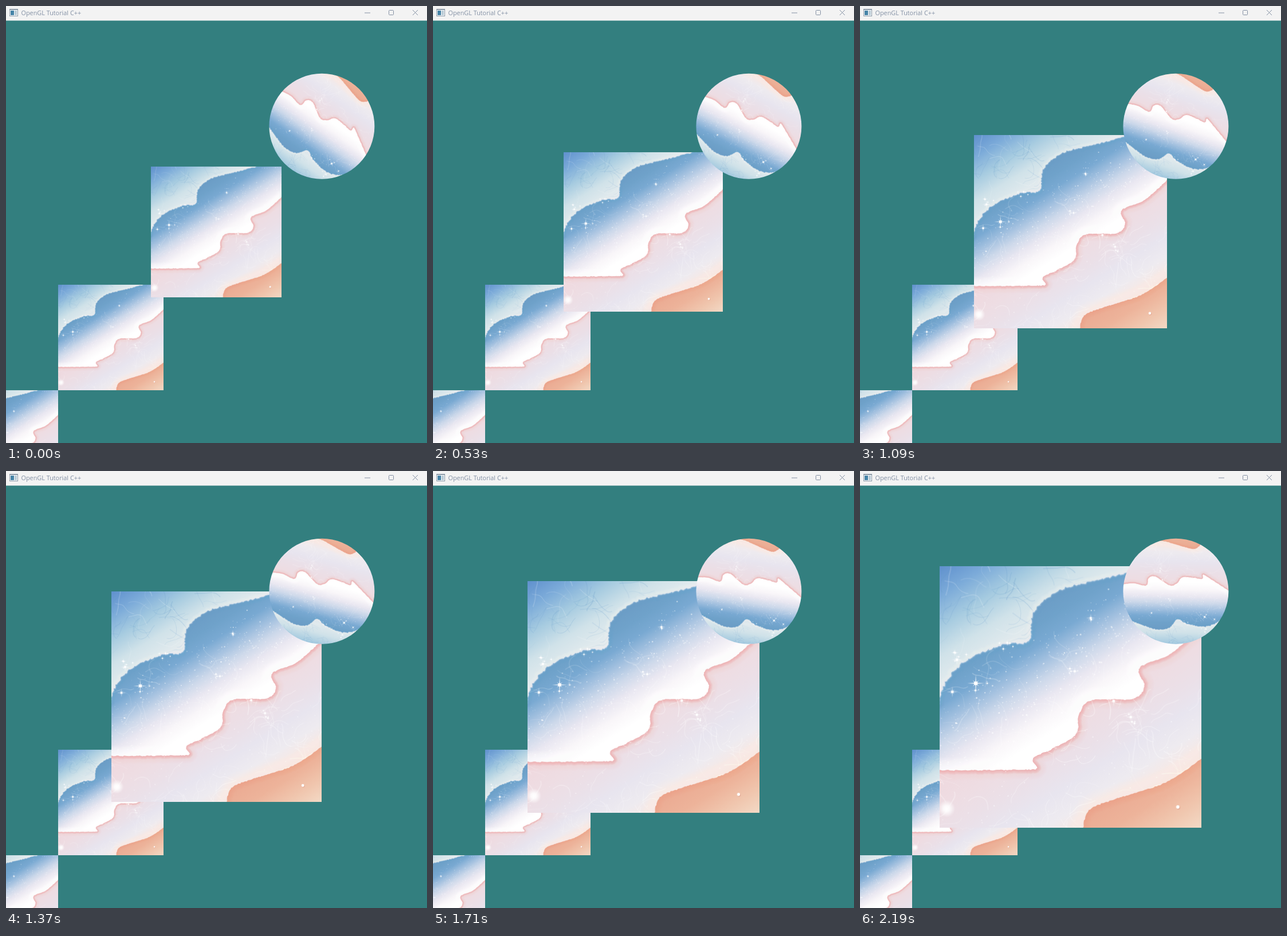
Recreate the animation shown at these times as an HTML page with a canvas. Size 735 by 762 pixels, loop 2260 ms.

```html
<!DOCTYPE html>
<html lang="en">
<head>
<meta charset="utf-8">
<title>OpenGL Tutorial C++</title>
<style>
html, body { margin: 0; width: 100%; height: 100%; overflow: hidden; background: #337f7f; }
canvas { display: block; }
</style>
</head>
<body>
<canvas id="stage" width="735" height="762"></canvas>
<script>
const ctx = document.getElementById('stage').getContext('2d');
const SIZE = 457;

let seed = 20;
function rnd() {
  seed = (seed * 1664525 + 1013904223) % 4294967296;
  return seed / 4294967296;
}
const spread = r => (rnd() * 2 - 1) * r;

// Key points of the three shorelines, from left to right
const foamKeys = [[-4, 245], [9, 206], [42, 169], [108, 138], [156, 131], [163, 84], [206, 44], [281, 24], [388, -4]];
const washKeys = [[-4, 357], [70, 357], [130, 356], [169, 354], [163, 336], [200, 318], [238, 295], [243, 262],
  [259, 237], [300, 233], [340, 232], [358, 211], [350, 178], [405, 153], [461, 102]];
const sandKeys = [[250, 464], [261, 427], [311, 406], [396, 378], [461, 334]];

// Smooth curve through the keys with a ragged edge
function shore(keys, rough) {
  const at = i => keys[Math.max(0, Math.min(keys.length - 1, i))];
  const pts = [];
  for (let i = 0; i < keys.length - 1; i++) {
    const [a, b, c, d] = [-1, 0, 1, 2].map(k => at(i + k));
    const n = Math.ceil(Math.hypot(c[0] - b[0], c[1] - b[1]) / 3);
    for (let j = 0; j < n; j++) {
      const t = j / n;
      pts.push([0, 1].map(k => spread(rough) + b[k] + 0.5 * t * (c[k] - a[k] +
        t * (2 * a[k] - 5 * b[k] + 4 * c[k] - d[k] + t * (3 * (b[k] - c[k]) + d[k] - a[k])))));
    }
  }
  return [...pts, at(keys.length)];
}

function trace(g, pts) {
  g.beginPath();
  pts.forEach(([x, y]) => g.lineTo(x, y));
}

// Colour ramp that runs across the waves
function ramp(g, from, to, colors) {
  const nx = 0.53, ny = 0.85;
  const grad = g.createLinearGradient(nx * from, ny * from, nx * to, ny * to);
  colors.forEach((c, i) => grad.addColorStop(i / (colors.length - 1), c));
  return grad;
}

function glow(g, pts, color, width, alpha) {
  g.strokeStyle = color;
  g.globalAlpha = alpha;
  for (let w = width; w > 1; w -= width / 9) {
    trace(g, pts);
    g.lineWidth = w;
    g.stroke();
  }
  g.globalAlpha = 1;
}

function region(g, pts, corners, fill, paint) {
  g.save();
  trace(g, pts.concat(corners));
  g.closePath();
  g.fillStyle = fill;
  g.fill();
  g.clip();
  paint();
  g.restore();
}

function veins(g, count, [x0, y0, w, h], color, alpha) {
  g.strokeStyle = color;
  for (let i = 0; i < count; i++) {
    let x = x0 + rnd() * w, y = y0 + rnd() * h, a = rnd() * 6.28;
    g.beginPath();
    g.moveTo(x, y);
    for (let j = 0; j < 4; j++) {
      const b = a + spread(1), r = 4 + rnd() * 5;
      const cx = x + Math.cos(a) * r, cy = y + Math.sin(a) * r;
      x = cx + Math.cos(b) * r;
      y = cy + Math.sin(b) * r;
      g.quadraticCurveTo(cx, cy, x, y);
      a = b;
    }
    g.globalAlpha = alpha * (0.4 + rnd() * 0.6);
    g.lineWidth = 0.7 + rnd() * 1.2;
    g.stroke();
  }
  g.globalAlpha = 1;
}

function dot(g, x, y, r, alpha = 1) {
  g.globalAlpha = alpha;
  g.beginPath();
  g.arc(x, y, r, 0, 7);
  g.fill();
  g.globalAlpha = 1;
}

function star(g, x, y, r) {
  g.beginPath();
  for (let i = 0; i < 16; i++) {
    const a = i * Math.PI / 8;
    const q = i % 2 ? r * 0.13 : i % 4 ? r * 0.5 : r;
    g.lineTo(x + Math.sin(a) * q, y + Math.cos(a) * q);
  }
  g.fill();
  dot(g, x, y, r * 0.22);
}

// One bright star with smaller ones around it
function cluster(g, x, y, r, count, reach) {
  star(g, x, y, r);
  for (let i = 0; i < count; i++) star(g, x + spread(reach), y + spread(reach * 0.7), 3 + rnd() * 4);
}

function blob(g, x, y, r) {
  const grad = g.createRadialGradient(x, y, 0, x, y, r);
  grad.addColorStop(0, '#fff');
  grad.addColorStop(0.35, 'rgba(255,255,255,.85)');
  grad.addColorStop(1, 'rgba(255,255,255,0)');
  g.fillStyle = grad;
  g.fillRect(x - r, y - r, 2 * r, 2 * r);
}

function makeBeach() {
  const c = document.createElement('canvas');
  c.width = c.height = SIZE;
  const g = c.getContext('2d');
  g.lineJoin = g.lineCap = 'round';
  const foam = shore(foamKeys, 1.8), wash = shore(washKeys, 0.9), sand = shore(sandKeys, 0.8);
  const right = [461, 461], left = [-4, 461];

  g.fillStyle = ramp(g, 0, 180, ['#5f90cd', '#7cabd9', '#a6cbe0', '#d0e2e9', '#e3ebee']);
  g.fillRect(0, 0, SIZE, SIZE);
  veins(g, 40, [0, 0, 220, 140], '#6499c9', 0.25);
  veins(g, 25, [0, 0, 330, 190], '#ffffff', 0.25);
  glow(g, foam, '#e9eff1', 16, 0.07);

  region(g, foam, [[461, -4], right, left],
    ramp(g, 150, 350, ['#6c9dc6', '#6fa2ca', '#79a9d2', '#a2c0df', '#ccd8ea', '#e9e7f1', '#f9f6f9', '#fff']), () => {
      glow(g, foam, '#6a9cc8', 18, 0.05);
      veins(g, 60, [40, 150, 380, 180], '#ffffff', 0.25);
      g.fillStyle = '#fff';
      for (let i = 0; i < 900; i++) {
        const x = rnd() * SIZE, s = 275 + (spread(1) + spread(1)) * 48;
        dot(g, x, (s - 0.53 * x) / 0.85, 0.4 + rnd() * rnd() * 1.3, 0.2 + rnd() * 0.6);
      }
      glow(g, wash, '#ffffff', 44, 0.1);
    });
  glow(g, foam, '#c3d7e6', 4, 0.06);

  region(g, wash, [right, left],
    ramp(g, 320, 525, ['#efd9df', '#eedde3', '#ebe0e8', '#e8e5ef', '#eeebf0', '#f9e8e2']), () => {
      glow(g, wash, '#eabfc1', 34, 0.07);
      glow(g, wash, '#e39c99', 14, 0.09);
      veins(g, 80, [190, 200, 270, 260], '#ffffff', 0.45);
      veins(g, 20, [0, 370, 250, 90], '#ffffff', 0.35);
      g.fillStyle = '#fff';
      for (let i = 0; i < 160; i++) dot(g, rnd() * SIZE, 200 + rnd() * 260, 0.4 + rnd() * 0.8, 0.5);
      glow(g, sand, '#fae4dc', 50, 0.06);
    });

  region(g, sand, [right], ramp(g, 505, 630, ['#ebab93', '#edb39a', '#f0c6ae', '#f3dac6']), () => {
    glow(g, sand, '#e7977f', 24, 0.07);
  });

  g.fillStyle = '#fff';
  star(g, 22, 220, 10);
  cluster(g, 63, 205, 15, 2, 20);
  cluster(g, 30, 164, 10, 5, 20);
  cluster(g, 118, 134, 6, 4, 16);
  cluster(g, 264, 91, 8, 1, 5);
  cluster(g, 236, 184, 8, 2, 14);
  cluster(g, 304, 236, 10, 1, 8);
  cluster(g, 334, 264, 9, 4, 18);
  blob(g, 12, 424, 15);
  g.fillStyle = '#d79582';
  dot(g, 417.3, 422.3, 3, 0.6);
  g.fillStyle = '#fff';
  dot(g, 416.3, 421, 2.9);
  return c;
}

function drawBar() {
  ctx.fillStyle = '#f3f3f3';
  ctx.fillRect(0, 0, 735, 25.5);
  ctx.fillStyle = '#8c9aa8';
  ctx.fillRect(6, 5, 15, 13);
  ctx.fillStyle = '#fafcfd';
  ctx.fillRect(7, 7, 13, 10);
  ctx.fillStyle = '#4583a6';
  ctx.fillRect(8, 8, 6, 8);
  ctx.fillStyle = '#b9cbd6';
  ctx.fillRect(15, 8, 4, 8);
  ctx.fillStyle = '#8491a5';
  ctx.font = '10.85px "Open Sans", "Noto Sans", sans-serif';
  ctx.fillText('OpenGL Tutorial C++', 26.5, 16);
  ctx.strokeStyle = '#8490a3';
  ctx.lineWidth = 1;
  ctx.beginPath();
  ctx.moveTo(626, 12);
  ctx.lineTo(636, 12);
  ctx.moveTo(710, 7);
  ctx.lineTo(719, 16);
  ctx.moveTo(719, 7);
  ctx.lineTo(710, 16);
  ctx.roundRect(668.5, 7.5, 8, 8, 1);
  ctx.stroke();
}

// Picture number for a time in the loop: four runs of eight (start, span)
const LOOP = 2260;
const runs = [[70, 460], [600, 490], [1160, 480], [1710, 480]];
function stepAt(t) {
  const k = runs.filter(([start]) => t >= start).length - 1;
  if (k < 0) return 0;
  const [start, span] = runs[k];
  return 1 + 8 * k + Math.min(7, Math.floor((t - start) * 7 / span + 0.01));
}

// The first run grows a little slower than the rest
const scaleAt = i => i < 8 ? 0.62 + 0.135 * i / 8 : 0.755 + 0.0202 * (i - 8);

const beach = makeBeach();
const HALF = 92;

function tile(x, y, half) {
  ctx.drawImage(beach, x - half, y - half, 2 * half, 2 * half);
}

function draw(t) {
  const s = scaleAt(stepAt(t));
  ctx.imageSmoothingQuality = 'high';
  ctx.fillStyle = '#337f7f';
  ctx.fillRect(0, 0, 735, 762);
  drawBar();

  const cx = 367.4, cy = 393.65;
  tile(cx - 4 * HALF, cy + 4 * HALF, HALF);
  tile(cx - 2 * HALF, cy + 2 * HALF, HALF);
  tile(cx, cy, 2 * HALF * s);

  ctx.save();
  ctx.translate(cx + 2 * HALF, cy - 2 * HALF);
  ctx.beginPath();
  ctx.arc(0, 0, HALF, 0, 7);
  ctx.clip();
  ctx.rotate((-112.8 - 54.2 * (s - 0.62)) * Math.PI / 180);
  tile(0, 0, HALF);
  ctx.restore();
}

const begin = performance.now();
function tick() {
  draw((performance.now() - begin) % LOOP);
  requestAnimationFrame(tick);
}
tick();
</script>
</body>
</html>
```
